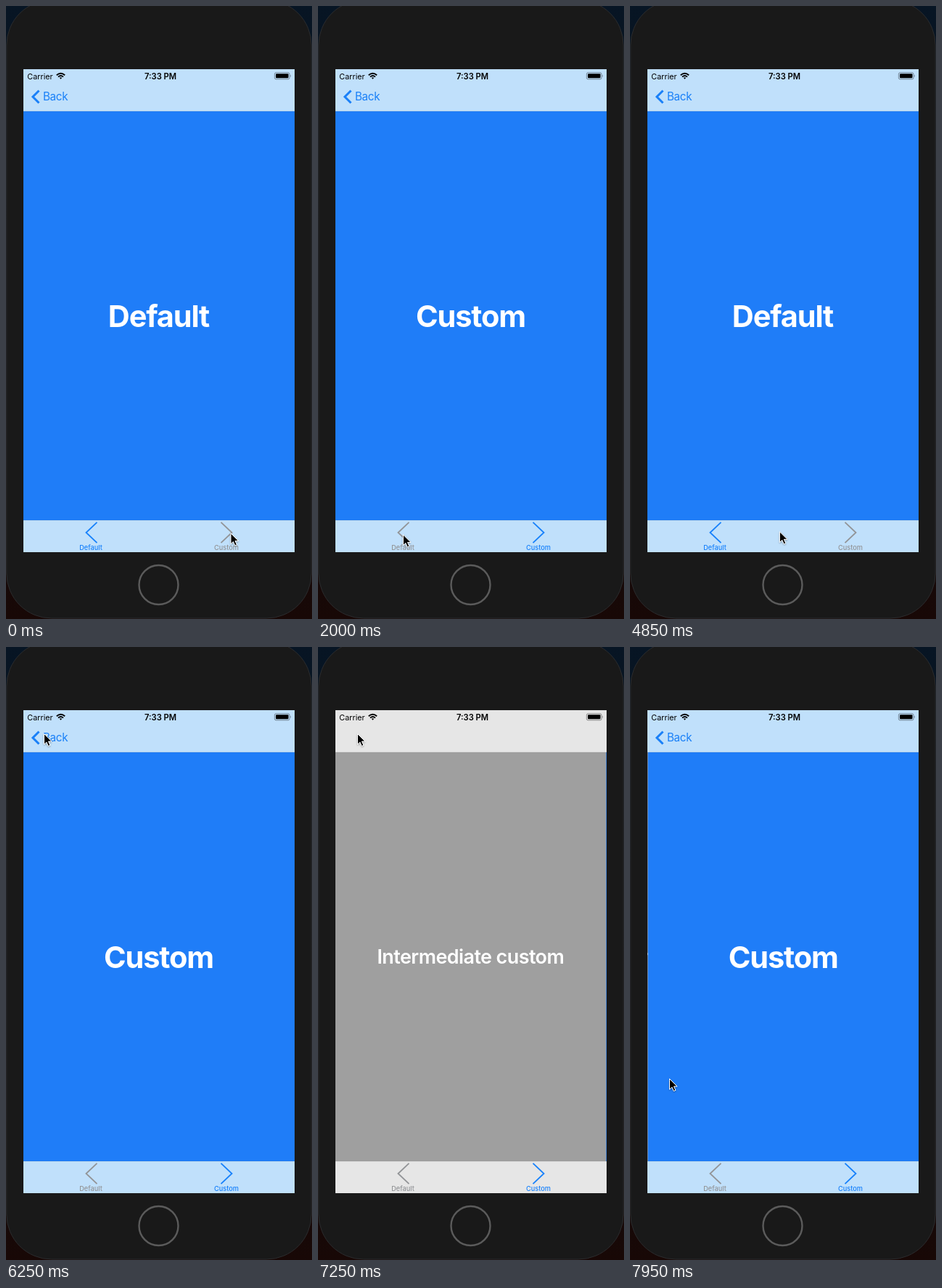
These frames come from a looping animation (422 by 844 pixels, 8 s). An HTML page:

```html
<!DOCTYPE html>
<html lang="en">
<head>
<meta charset="utf-8">
<title>Tab bar demo</title>
<style>
  html, body { margin: 0; width: 100%; height: 100%; overflow: hidden; background: #0b0d12; }
  svg { display: block; width: 422px; height: 844px; }
  text { font-family: Inter, "Open Sans", sans-serif; }
  .title { fill: #fff; font-weight: 700; font-size: 41.5px; letter-spacing: -1.15px; text-anchor: middle; }
  .subtitle { fill: #fff; font-weight: 600; font-size: 27px; letter-spacing: -.6px; text-anchor: middle; }
  .back { fill: #1a80f8; font-size: 15.3px; letter-spacing: -.4px; }
  .tab { --tint: #929497; }
  .tab.on { --tint: #1781fb; }
  .tab path { fill: none; stroke: var(--tint); stroke-width: 1.8; }
  .tab text { fill: var(--tint); font-size: 9.2px; font-weight: 500; text-anchor: middle; }
</style>
</head>
<body>
<svg viewBox="0 0 422 844">
  <defs>
    <linearGradient id="desk" x2="0" y2="1">
      <stop stop-color="#071524"/><stop offset=".5" stop-color="#0b0d12"/><stop offset="1" stop-color="#180806"/>
    </linearGradient>
    <linearGradient id="soft">
      <stop stop-color="#c0e0fb" stop-opacity="0"/><stop offset="1" stop-color="#c0e0fb"/>
    </linearGradient>
    <clipPath id="screen"><path d="M24 87h374v665h-374z"/></clipPath>
    <filter id="shade" x="-50%" y="-50%" width="200%" height="200%">
      <feDropShadow dx="0" dy="1" stdDeviation="1" flood-opacity=".35"/>
    </filter>
  </defs>

  <rect width="422" height="844" fill="url(#desk)"/>
  <rect x=".8" y="-8" width="420.4" height="851" rx="62" fill="#191919" stroke="#2b2c2e"/>
  <circle cx="210.5" cy="797" r="27" fill="none" stroke="#5b5b5b" stroke-width="2.4"/>

  <g clip-path="url(#screen)">
    <g id="under">
      <rect x="24" y="87" width="600" height="665" fill="#9f9f9f"/>
      <text class="subtitle" x="210.5" y="436">Intermediate custom</text>
    </g>
    <rect id="dim" x="24" y="87" width="374" height="665"/>
    <g id="over">
      <rect x="24" y="87" width="374" height="665" fill="#1f7df8"/>
      <text id="title" class="title" x="210.5" y="442"></text>
    </g>

    <path fill="#e6e6e6" d="M24 87h374v58h-374zM24 708h374v44h-374z"/>
    <g id="tint">
      <path fill="url(#soft)" d="M4 87h20v58h-20zM4 708h20v44h-20z"/>
      <path fill="#c0e0fb" d="M24 87h394v58h-394zM24 708h394v44h-394z"/>
    </g>
    <path d="M24 144.7h374M24 708.2h374" stroke="#000" stroke-opacity=".14" stroke-width=".6"/>

    <g id="back">
      <path d="M45.5 116.5 37 125l8.5 8.5" fill="none" stroke="#1a80f8" stroke-width="3"/>
      <text class="back" x="51" y="130.3">Back</text>
    </g>

    <text x="29.3" y="100.5" font-size="10.8">Carrier</text>
    <text x="213" y="100.5" font-size="11.2" font-weight="600" text-anchor="middle">7:33 PM</text>
    <g fill="none" stroke="#000" stroke-width="1.9">
      <path d="M69.8 95.2q5.7-5 11.4 0M72 97.6q3.5-3 7 0"/>
      <path d="M73.8 98.8q1.7-1.3 3.4 0l-1.7 2z" fill="#000" stroke="none"/>
    </g>
    <rect x="370.4" y="91.8" width="20.6" height="9" rx="2" fill="none" stroke="#000" stroke-opacity=".45" stroke-width=".9"/>
    <rect x="372" y="93.3" width="17.5" height="6" rx="1"/>
    <path d="M392.2 94.6q1.6 1.6 0 3.4z" fill-opacity=".5"/>

    <g class="tab" id="tabDefault">
      <path d="M125.5 710.8 110.5 725l15 14.2"/>
      <text x="117" y="749">Default</text>
    </g>
    <g class="tab" id="tabCustom">
      <path d="M296.5 710.8l15 14.2-15 14.2"/>
      <text x="304" y="749">Custom</text>
    </g>
  </g>

  <path id="cursor" d="M0 0v14.6l3.4-3.1 2.4 5.4 2.6-1.1-2.4-5.3h4.6z" stroke="#fff" stroke-width="1" filter="url(#shade)"/>
</svg>
<script>
  const LOOP = 8000, WIDTH = 374;
  const POP = 6780, PUSH = 7490;

  // time, x, y of the pointer tip
  const pointer = [
    [0, 310, 726], [950, 310, 726], [1600, 117.5, 728], [2400, 117.5, 728],
    [2900, 143.5, 731], [3250, 143.5, 731], [3600, 118, 728], [4000, 118, 728],
    [4300, 118, 722], [4615, 118, 722], [5115, 311, 726], [5450, 311, 726],
    [6050, 52.5, 119.5], [6500, 52.5, 119.5], [6700, 54.5, 119.5],
    [7350, 54.5, 119.5], [7950, 54.5, 594.5], [LOOP, 54.5, 594.5]
  ];
  // time of each tab selection
  const taps = [[0, "Default"], [500, "Custom"], [3700, "Default"], [5250, "Custom"]];

  const el = id => document.getElementById(id);
  const move = (id, x, y = 0) => el(id).setAttribute("transform", `translate(${x} ${y})`);
  const ease = u => u * u * (3 - 2 * u);

  // critically damped spring from 0 to 1
  function spring(ms) {
    const a = 0.01826 * Math.max(0, ms);
    return 1 - (1 + a) * Math.exp(-a);
  }

  function pointerAt(t) {
    const i = pointer.findIndex(k => k[0] > t);
    const [t0, x0, y0] = pointer[i - 1], [t1, x1, y1] = pointer[i];
    const u = ease((t - t0) / (t1 - t0));
    return [x0 + (x1 - x0) * u, y0 + (y1 - y0) * u];
  }

  function draw(t) {
    const tab = taps.filter(k => k[0] <= t).pop()[1];
    const shown = t < PUSH ? 1 - spring(t - POP) : spring(t - PUSH);
    el("title").textContent = tab;
    for (const name of ["Default", "Custom"])
      el("tab" + name).classList.toggle("on", name === tab);

    move("over", WIDTH * (1 - shown));
    move("under", -0.3 * WIDTH * shown);
    move("tint", (WIDTH + 20) * (1 - shown));
    el("dim").setAttribute("opacity", 0.1 * shown);
    el("back").setAttribute("opacity", shown < 0.01 ? 0 : shown);
    move("cursor", ...pointerAt(t));
  }

  const start = performance.now();
  function tick() {
    draw((performance.now() - start) % LOOP);
    requestAnimationFrame(tick);
  }
  tick();
</script>
</body>
</html>
```
